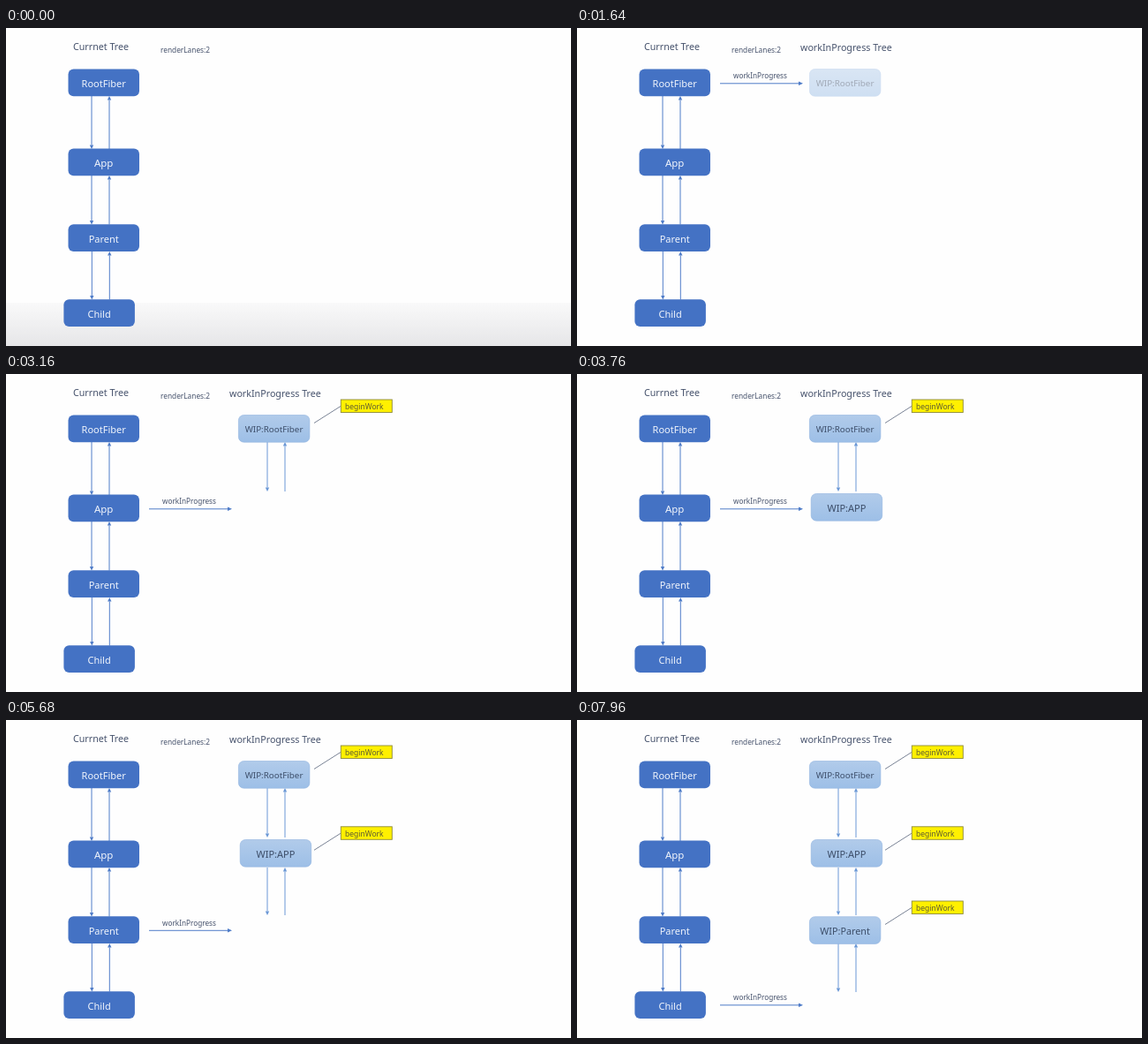
Write an HTML page that moves like this. It is 640x360 px and loops after 8 s.

```html
<!DOCTYPE html>
<html lang="en">
<head>
<meta charset="utf-8">
<title>Fiber tree: beginWork</title>
<style>
html, body { margin: 0; width: 100%; height: 100%; overflow: hidden; background: #fefefe; }
svg { display: block; width: 100vw; height: 100vh; }
text { font-family: "Noto Sans", sans-serif; fill: #46526c; dominant-baseline: central; }
.current rect { fill: #4472c4; }
.current text { fill: #f1f5fc; }
.wip rect { fill: url(#pale); stroke: #8fb3e0; stroke-width: .6; }
.wip text { fill: #3c4d68; }
.link { stroke: #4f7cc8; fill: #4f7cc8; }
.wip-link { stroke: #6b98d6; fill: #6b98d6; }
.note rect { fill: #fff000; stroke: #8d8a3c; stroke-width: .9; }
.note text { fill: #5b5a32; }
.note line { stroke: #6b7589; stroke-width: .9; }
</style>
</head>
<body>
<svg id="stage" viewBox="0 0 640 360">
  <defs>
    <linearGradient id="pale" x2="0" y2="1">
      <stop stop-color="#b1cbea"/><stop offset="1" stop-color="#9dbfe7"/>
    </linearGradient>
    <linearGradient id="shade" x2="0" y2="1">
      <stop stop-color="#e6e6e8" stop-opacity=".2"/><stop offset="1" stop-color="#e6e6e8"/>
    </linearGradient>
  </defs>
</svg>
<script>
const LOOP = 8000;
const stage = document.getElementById('stage');

function add(markup, className = '') {
  const group = document.createElementNS('http://www.w3.org/2000/svg', 'g');
  group.setAttribute('class', className);
  group.innerHTML = markup;
  return stage.appendChild(group);
}

const label = (x, y, size, text, anchor = 'start') =>
  `<text x="${x}" y="${y}" font-size="${size}" text-anchor="${anchor}">${text}</text>`;

const node = (x, y, text, size = 11) =>
  `<rect x="${x}" y="${y}" width="80.5" height="30.7" rx="6"/>` +
  label(x + 40.2, y + 15.9, size, text, 'middle');

// Vertical arrow from y1 to y2, pointing either way.
function arrow(x, y1, y2) {
  const back = y2 - Math.sign(y2 - y1) * 4.5;
  return `<path stroke-width="1" d="M${x} ${y1}V${back}"/>` +
    `<path stroke="none" d="M${x} ${y2}L${x - 2.2} ${back}H${x + 2.2}Z"/>`;
}

const arrowPair = (x, top, bottom) => arrow(x, top, bottom) + arrow(x + 20, bottom, top);

const note = y =>
  `<line x1="349" y1="${y + 19}" x2="379" y2="${y}"/>` +
  `<rect x="379.3" y="${y - 7.5}" width="58" height="14.5"/>` +
  label(384, y, 8.5, 'beginWork');

const shade = add('<rect y="311" width="640" height="49" fill="url(#shade)"/>');

add(label(76, 20.8, 10.7, 'Currnet Tree') + label(175, 24.2, 8.3, 'renderLanes:2'));
add(arrowPair(97, 77, 137) + arrowPair(97, 167, 222.5) + arrowPair(97.3, 253, 307.5), 'link');
add(node(70.5, 46.6, 'RootFiber') + node(70.5, 136.6, 'App', 11.5) +
    node(70.5, 222.2, 'Parent') + node(65.4, 307.2, 'Child'), 'current');

const title = add(label(253, 22.4, 10.7, 'workInProgress Tree'));
const pointer = add(
  label(207.5, -9.3, 8.2, 'workInProgress', 'middle') +
  '<g class="link"><path d="M162 0H251"/><path stroke="none" d="M256 0L251 -2.2V2.2Z"/></g>');

const rows = [
  { box: node(263.4, 46.5, 'WIP:RootFiber', 9.8), noteY: 36.5, top: 77, bottom: 133,
    boxAt: 1450, noteAt: 2120, moveAt: 2410 },
  { box: node(265.2, 135.5, 'WIP:APP'), noteY: 128.3, top: 167, bottom: 221,
    boxAt: 3300, noteAt: 4440, moveAt: 4800 },
  { box: node(263.4, 222.7, 'WIP:Parent', 10.8), noteY: 212.5, top: 253, bottom: 308,
    boxAt: 6150, noteAt: 6760, moveAt: 7190 }
];
const pointerY = [62.8, 152.8, 238.3, 322.8];

for (const row of rows) {
  row.links = add(arrowPair(296, row.top, row.bottom), 'wip-link');
  row.boxGroup = add(row.box, 'wip');
  row.noteGroup = add(note(row.noteY), 'note');
}

const progress = (t, start, duration) => Math.min(1, Math.max(0, (t - start) / duration));
const ease = u => u * u * (3 - 2 * u);
const fade = (element, amount) => element.setAttribute('opacity', amount);

// Reveals arrows from the top down, with margin for the arrowheads.
function wipe(row, amount) {
  const hidden = (1 - amount) * (row.bottom - row.top);
  row.links.style.clipPath = `inset(0 -5px ${hidden}px -5px)`;
  row.links.style.visibility = amount > 0 ? 'visible' : 'hidden';
}

function draw(t) {
  fade(shade, 1 - progress(t, 40, 360));
  fade(title, progress(t, 80, 320));
  fade(pointer, progress(t, 400, 340));

  let y = pointerY[0];
  rows.forEach((row, i) => {
    fade(row.boxGroup, progress(t, row.boxAt, 400));
    fade(row.noteGroup, progress(t, row.noteAt, 300));
    wipe(row, progress(t, row.moveAt, 500));
    y += (pointerY[i + 1] - pointerY[i]) * ease(progress(t, row.moveAt, 750));
  });
  pointer.setAttribute('transform', `translate(0 ${y})`);
}

const start = performance.now();
function tick() {
  draw((performance.now() - start) % LOOP);
  requestAnimationFrame(tick);
}
tick();
</script>
</body>
</html>
```
